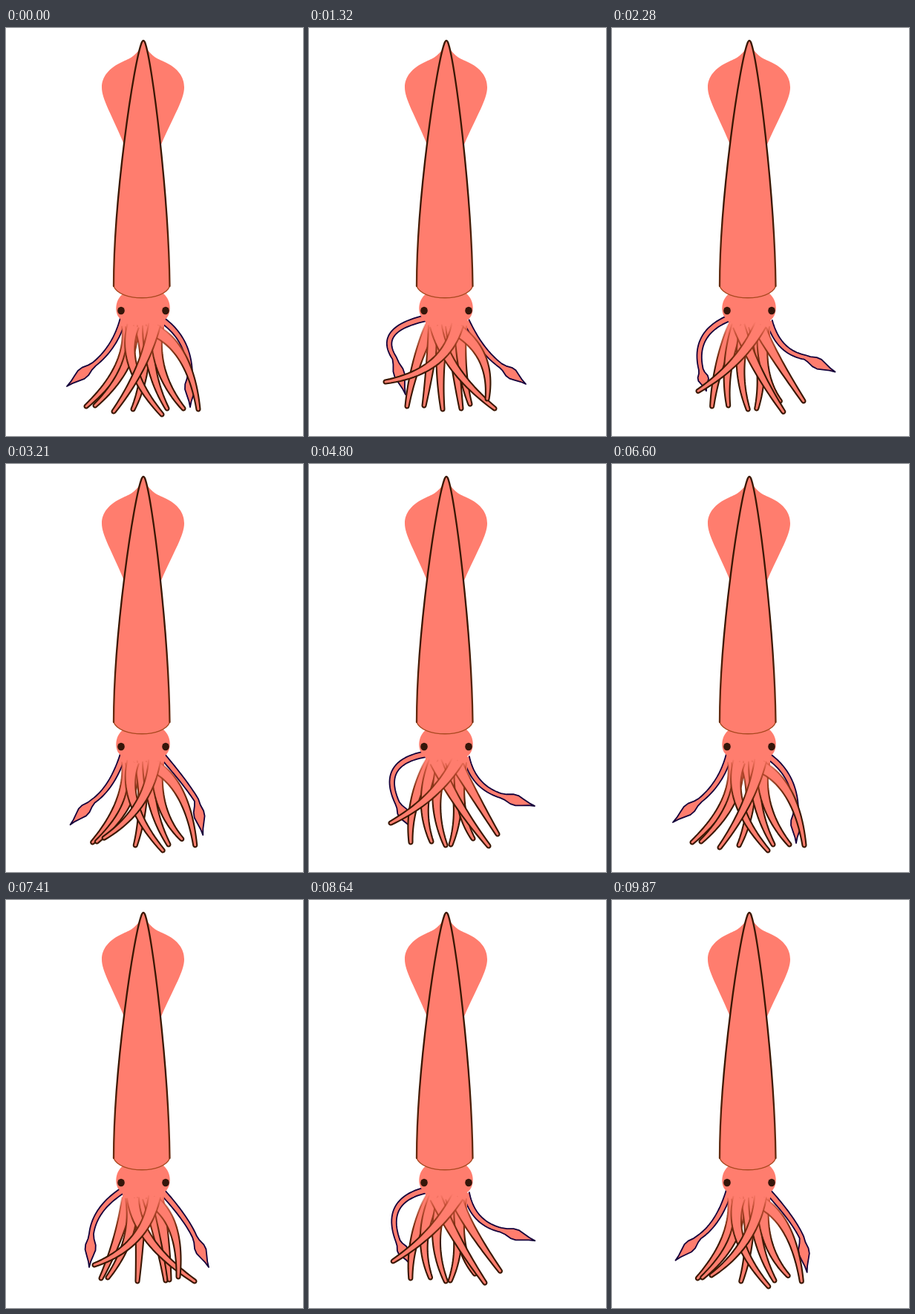
These frames come from a looping animation (400x550 px, 9900 ms). An HTML page with a canvas:

```html
<!DOCTYPE html>
<html lang="en">
<head>
<meta charset="utf-8">
<title>Squid</title>
<style>
  html, body { margin: 0; width: 100%; height: 100%; overflow: hidden; background: #fff; }
  canvas { display: block; width: 400px; height: 550px; }
</style>
</head>
<body>
<canvas id="stage"></canvas>
<script>
const W = 400, H = 550, LOOP = 9900, SWEEP = 3300, STEP = 30;
const FLESH = '#ff7d6e', INK = '#3a1702', NAVY = '#14003a';

const canvas = document.getElementById('stage');
const ctx = canvas.getContext('2d');
const ratio = window.devicePixelRatio || 1;
canvas.width = W * ratio;
canvas.height = H * ratio;
ctx.scale(ratio, ratio);
ctx.lineJoin = ctx.lineCap = 'round';

// Pose times within one swing cycle
const TIMES = [0, 810, 1320, 1800, 3240], CYCLE = 3600;

// Listed from back to front; a plain number stays fixed
const arms = [
  { root: [164, 402], midX: [152, 150, 144, 142, 153], midY: 456, tipX: [108, 128, 132, 137, 116], tipY: 510 },
  { root: [169, 402], midX: [160, 164, 163, 156, 163], midY: 456, tipX: [120, 137, 155, 165, 122], tipY: 509 },
  { root: [181, 402], midX: [186, 180, 177, 172, 184], midY: 458, tipX: [171, 177, 180, 184, 174], tipY: 514 },
  { root: [192, 402], midX: [197, 206, 198, 200, 198], midY: 460, tipX: [217, 215, 205, 191, 219], tipY: 513 },
  { root: [204, 402], midX: [209, 214, 207, 205, 210], midY: 460, tipX: [239, 220, 217, 221, 237], tipY: [513, 512, 507, 505, 506] },
  { root: [171, 402], midX: [172, 194, 197, 202, 173], midY: 459, tipX: [210, 254, 250, 242, 211], tipY: [521, 514, 513, 515, 521] },
  { root: [201, 408], midX: [239, 226, 234, 223, 236], midY: 447, tipX: [259, 232, 240, 254, 255], tipY: [514, 508, 500, 499, 514] },
  { root: [200, 400], midX: [180, 174, 168, 163, 179], midY: [459, 456, 451, 447, 459], tipX: [145, 119, 103, 110, 133], tipY: [517, 492, 477, 484, 505] }
];

const feelers = [
  { root: [158, 391], midX: [143, 128, 113, 116, 141], midY: [426, 418, 412, 413, 429],
    neckX: [119, 115, 115, 119, 118], neckY: [453, 450, 445, 457, 454],
    tipX: [82, 112, 130, 138, 86], tipY: [483, 495, 494, 491, 486] },
  { root: [212, 395], midX: [238, 238, 233, 228, 239], midY: [425, 427, 430, 428, 428],
    neckX: [248, 254, 258, 258, 256], neckY: [465, 454, 455, 447, 454],
    tipX: [248, 273, 292, 304, 264], tipY: [511, 495, 480, 461, 501] }
];

// Smooth cyclic curve through the poses
function at(v, time) {
  if (!Array.isArray(v)) return v;
  const n = TIMES.length;
  const when = i => TIMES[(i + n) % n] + CYCLE * Math.floor(i / n);
  const val = i => v[(i + n) % n];
  const rate = i => (val(i + 1) - val(i)) / (when(i + 1) - when(i));
  const slope = i => {
    const a = when(i) - when(i - 1), b = when(i + 1) - when(i);
    return (rate(i - 1) * b + rate(i) * a) / (a + b);
  };
  let i = n - 1;
  while (TIMES[i] > time) i--;
  const h = when(i + 1) - when(i), u = (time - when(i)) / h, w = 1 - u;
  return val(i) * (1 + 2 * u) * w * w + val(i + 1) * u * u * (3 - 2 * u)
    + h * u * w * (slope(i) * w - slope(i + 1) * u);
}

// Points on both sides of a quadratic curve that passes through mid
function sides(root, mid, end, half) {
  const c = [0, 1].map(k => 2 * mid[k] - (root[k] + end[k]) / 2);
  const left = [], right = [];
  for (let i = 0; i <= 24; i++) {
    const t = i / 24, s = 1 - t;
    const [x, y] = [0, 1].map(k => s * s * root[k] + 2 * s * t * c[k] + t * t * end[k]);
    const [dx, dy] = [0, 1].map(k => s * (c[k] - root[k]) + t * (end[k] - c[k]));
    const r = half(t) / (Math.hypot(dx, dy) || 1);
    left.push([x - dy * r, y + dx * r]);
    right.unshift([x + dy * r, y - dx * r]);
  }
  return { left, right };
}

// Half circle that joins the two sides at the end of an arm
function cap([ax, ay], [bx, by]) {
  const r = Math.hypot(ax - bx, ay - by) / 2, from = Math.atan2(ay - by, ax - bx);
  return [1, 2, 3, 4, 5].map(i => {
    const a = from - Math.PI * i / 6;
    return [(ax + bx) / 2 + r * Math.cos(a), (ay + by) / 2 + r * Math.sin(a)];
  });
}

function shape(points, stroke, width) {
  const path = new Path2D();
  points.forEach(([x, y]) => path.lineTo(x, y));
  fillPath(path, FLESH);
  linePath(path, stroke, width);
}

const armInk = ctx.createLinearGradient(0, 396, 0, 462);
armInk.addColorStop(0, 'rgba(190,70,40,0)');
armInk.addColorStop(0.25, 'rgba(170,62,32,.7)');
armInk.addColorStop(0.65, '#7a3012');
armInk.addColorStop(1, INK);

function drawArm(arm, time) {
  const mid = [at(arm.midX, time), at(arm.midY, time)];
  const tip = [at(arm.tipX, time), at(arm.tipY, time)];
  const { left, right } = sides(arm.root, mid, tip, t => 8 - 5.5 * t);
  shape([...left, ...cap(left[left.length - 1], right[0]), ...right], armInk, 2.1);
}

function drawFeeler(f, time) {
  const mid = [at(f.midX, time), at(f.midY, time)];
  const neck = [at(f.neckX, time), at(f.neckY, time)];
  const tip = [at(f.tipX, time), at(f.tipY, time)];
  const { left, right } = sides(f.root, mid, neck, t => 4 - t);
  const dx = tip[0] - neck[0], dy = tip[1] - neck[1], len = Math.hypot(dx, dy);
  const leaf = (t, r) => [neck[0] + dx * t - dy / len * r, neck[1] + dy * t + dx / len * r];
  const club = [[0.15, 4], [0.33, 6.8], [0.48, 7], [0.65, 4.4], [0.83, 1.6]];
  shape([
    ...left,
    ...club.map(([t, r]) => leaf(t, r)),
    tip,
    ...club.map(([t, r]) => leaf(t, -r)).reverse(),
    ...right
  ], NAVY, 1.8);
}

const fins = new Path2D('M185 20C194 37 201 40 212 45C232 54 240 66 240 80C240 96 227 116 209 157H159C142 116 129 96 129 80C129 66 138 54 158 45C169 40 176 37 185 20Z');
const head = new Path2D('M158 358C147 366 146 382 152 390L157 396V418Q185 430 213 420V394C223 388 224 368 212 358Z');
const mantleSides = 'M145 348C145 230 172 45 183 19Q185 15 187 19C197 45 219 225 220.5 348';
const mantle = new Path2D(mantleSides + 'C213 369 153 369 145 348Z');
const outline = new Path2D(mantleSides);
const hem = new Path2D('M145 348C153 369 213 369 220.5 348');

const sideInk = ctx.createLinearGradient(0, 16, 0, 350);
sideInk.addColorStop(0, INK);
sideInk.addColorStop(0.65, INK);
sideInk.addColorStop(1, '#6a2c10');

function fillPath(path, color) {
  ctx.fillStyle = color;
  ctx.fill(path);
}

function linePath(path, color, width) {
  ctx.strokeStyle = color;
  ctx.lineWidth = width;
  ctx.stroke(path);
}

function drawEye(x) {
  const eye = new Path2D();
  eye.ellipse(x, 381, 4.8, 5.3, 0, 0, Math.PI * 2);
  fillPath(eye, '#35160a');
}

function draw(time) {
  ctx.fillStyle = '#fff';
  ctx.fillRect(0, 0, W, H);
  feelers.forEach(f => drawFeeler(f, time));
  fillPath(head, FLESH);
  arms.forEach(a => drawArm(a, time));
  fillPath(fins, FLESH);
  fillPath(mantle, FLESH);
  linePath(hem, '#a8481f', 1.3);
  linePath(outline, sideInk, 2.3);
  drawEye(155);
  drawEye(215);
}

// Sweep forward, back and forward again, then cut to the start
function tick() {
  const now = Math.floor(performance.now() % LOOP / STEP) * STEP;
  const turn = now % (2 * SWEEP);
  draw(turn <= SWEEP ? turn : 2 * SWEEP - turn);
  requestAnimationFrame(tick);
}
tick();
</script>
</body>
</html>
```
